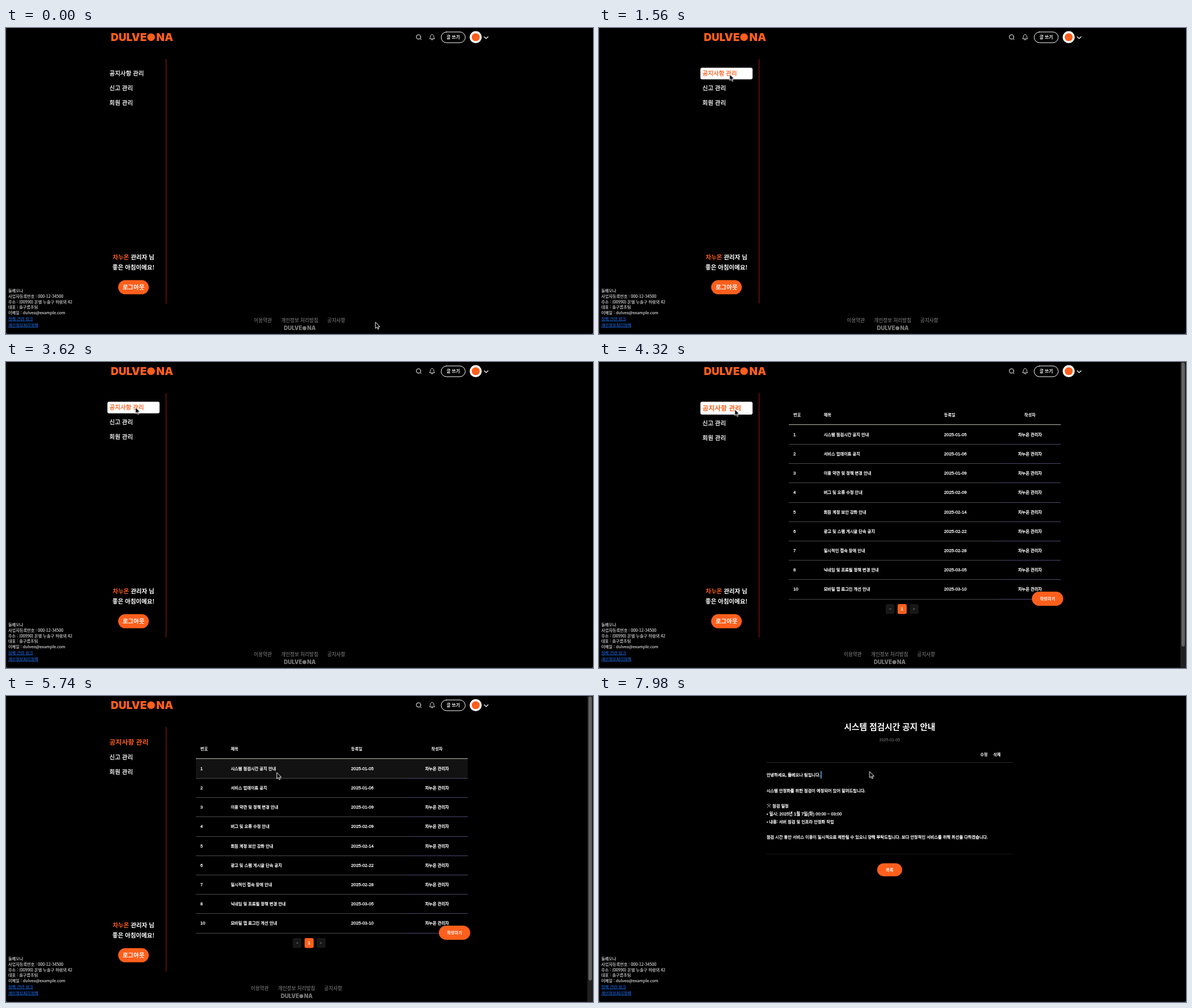
Write an HTML page that moves like this. It is 1036 by 541 pixels and loops after 8 s.

```html
<!DOCTYPE html>
<html lang="ko">
<head>
<meta charset="utf-8">
<title>관리자 공지사항</title>
<style>
  html, body { margin: 0; width: 100%; height: 100%; overflow: hidden; background: #000; }
  svg { display: block; width: 1036px; height: 541px; color: #fff; --brand: #ff5f1c; }
  /* A hairline stroke gives regular glyphs a medium weight. */
  text {
    font-family: "Noto Sans CJK KR", "Noto Sans CJK", "Noto Sans", sans-serif;
    font-size: 7.28px; font-weight: 500; white-space: pre;
    fill: currentColor; stroke: currentColor; stroke-width: .28px;
  }
  .b, .hello text { font-weight: 700; stroke: none; }
  .mid { text-anchor: middle; }
  .menu text, .hello text { font-size: 10.5px; }
  .num { font-family: "Liberation Sans", "Noto Sans CJK KR", sans-serif; font-size: 7.8px; }
  .info text { font-size: 7.2px; font-weight: 400; color: #e6e6e6; stroke-width: .12px; }
  .info .link { color: #1f69e0; text-decoration: underline; }
  .foot text { font-size: 8.6px; font-weight: 400; color: #7c7c7c; stroke-width: .1px; }
  .logo text { font: 900 19px Inter, sans-serif; fill: inherit; stroke: none; }
  .brand { fill: var(--brand); }
  .icon { fill: none; stroke: #fff; stroke-linecap: round; stroke-linejoin: round; }

  .home, .list, .post, .caret, .row1, .row2, .foot { animation: 8s step-end infinite; }
  .home { animation-name: home; }
  .list { animation-name: list; }
  .post { animation-name: post; }
  .caret { animation-name: caret; }
  .row1 { animation-name: row1; }
  .row2 { animation-name: row2; }
  .foot { animation-name: foot; }
  .pick, .pickBox, .other, .memberBox, .member, .cursor { animation: 8s linear infinite; }
  .pick { animation-name: pick; }
  .pickBox { animation-name: pickBox; }
  .other { animation-name: other; }
  .memberBox { animation-name: memberBox; }
  .member { animation-name: member; }
  .cursor { animation-name: cursor; }

  @keyframes home { 0% { opacity: 1 } 88.75%, 100% { opacity: 0 } }
  @keyframes list { 0% { opacity: 0 } 50% { opacity: 1 } 88.75%, 100% { opacity: 0 } }
  @keyframes post { 0% { opacity: 0 } 88.75%, 100% { opacity: 1 } }
  @keyframes caret { 0% { opacity: 0 } 95%, 100% { opacity: 1 } }
  @keyframes foot { 0% { transform: none } 50%, 100% { transform: translateX(-5.5px) } }
  @keyframes row1 { 0% { opacity: 0 } 60.3% { opacity: 1 } 62.4% { opacity: 0 } 69.5%, 100% { opacity: 1 } }
  @keyframes row2 { 0% { opacity: 0 } 62.4% { opacity: 1 } 69.5%, 100% { opacity: 0 } }
  @keyframes pick {
    0%, 15% { color: #fff; font-size: 10.5px; font-weight: 500; stroke-width: .28px; transform: none }
    18% { color: #ff5f1c }
    50% { font-size: 10.5px; font-weight: 500; stroke-width: .28px; transform: none; animation-timing-function: ease }
    56%, 100% { color: #ff5f1c; font-size: 11.9px; font-weight: 700; stroke-width: 0px; transform: translateY(1.6px) }
  }
  @keyframes pickBox {
    0%, 15% { opacity: 0; height: 20.5px }
    18%, 59% { opacity: 1 }
    50% { height: 20.5px; animation-timing-function: ease }
    56%, 100% { height: 23px }
    59% { animation-timing-function: ease-out }
    63.7%, 100% { opacity: 0 }
  }
  @keyframes other {
    0%, 50% { transform: none; animation-timing-function: ease }
    56%, 100% { transform: translateY(2px) }
  }
  @keyframes memberBox { 0%, 8.5% { opacity: 0 } 10.7% { opacity: .9 } 13.75% { opacity: .12 } 15%, 100% { opacity: 0 } }
  @keyframes member { 0%, 8.5% { color: #fff } 10.7% { color: #ff5f1c } 13.75%, 100% { color: #fff } }
  @keyframes cursor {
    0%, 1% { transform: translate(652px, 520px); animation-timing-function: ease-in-out }
    10.3% { transform: translate(236px, 127px) }
    13.75% { transform: translate(241px, 97.5px); animation-timing-function: ease-out }
    17% { transform: translate(231px, 82px) }
    30%, 50% { transform: translate(228.5px, 80px); animation-timing-function: ease-in-out }
    54% { transform: translate(239.5px, 83.5px) }
    57% { transform: translate(244px, 85px); animation-timing-function: ease-in-out }
    63.25%, 67.5% { transform: translate(481.5px, 151.5px); animation-timing-function: ease-in-out }
    73%, 100% { transform: translate(477.5px, 133.5px) }
  }
</style>
</head>
<body>
<svg viewBox="0 0 1036 541">
  <rect width="1036" height="541"/>
  <path d="M.5 0V540.5H1036" fill="none" stroke="#12191e"/>
  <path d="M0 538Q0 541 3 541H0ZM1036 538Q1036 541 1033 541H1036Z" fill="#66747e"/>

  <g class="home">
    <defs>
      <g id="logo" class="logo">
        <text x="-1" y="13.5">DULVE</text>
        <circle cx="70" cy="6.7" r="6.8"/>
        <text x="109" y="13.5" text-anchor="end">NA</text>
      </g>
    </defs>
    <use href="#logo" x="186" y="9.5" class="brand"/>
    <g class="icon">
      <circle cx="728" cy="15.8" r="3.9"/>
      <path d="M731 18.8L732.8 20.6"/>
      <path d="M747.8 18.8C749.4 17.4 748.6 14.8 749.3 13.4C750.4 11 753.6 11 754.7 13.4C755.4 14.8 754.6 17.4 756.2 18.8ZM750.8 20.8H753.2" stroke-width=".9"/>
      <rect x="768" y="7" width="42.5" height="19" rx="9.5"/>
      <path d="M844 15.5L847.4 18.8L850.8 15.5" stroke-width="1.2"/>
    </g>
    <text class="b mid" x="789.3" y="19.3" style="font-size:7.7px">글 쓰기</text>
    <circle cx="829" cy="16.2" r="10.6" fill="#fff"/>
    <circle class="brand" cx="829" cy="16.2" r="7"/>

    <rect x="282" y="55" width="1" height="432" fill="#9c1a0c"/>
    <g class="menu">
      <rect class="pickBox" x="179" y="70.2" width="92" height="20.5" rx="3" fill="#fff"/>
      <rect class="memberBox" x="179" y="122.3" width="92" height="20.3" rx="3" fill="#fff"/>
      <text class="pick" x="182.5" y="84.4">공지사항 관리</text>
      <g class="other">
        <text x="182.5" y="110.3">신고 관리</text>
        <text class="member" x="182.5" y="136.4">회원 관리</text>
      </g>
    </g>
    <g class="hello mid">
      <text x="225" y="409.4"><tspan class="brand">차누온</tspan> 관리자 님</text>
      <text x="225" y="427">좋은 아침이에요!</text>
      <rect class="brand" x="198" y="445.8" width="54" height="25" rx="12.5"/>
      <text x="225" y="462.2">로그아웃</text>
    </g>

    <g class="foot">
      <text x="437.5" y="520.3">이용약관</text>
      <text x="485.5" y="520.3">개인정보 처리방침</text>
      <text x="567" y="520.3">공지사항</text>
      <use href="#logo" transform="translate(491 527.4) scale(.51)" fill="#777"/>
    </g>
  </g>

  <g class="list">
    <rect class="row1" x="335" y="111" width="480" height="34.5" fill="#121212"/>
    <rect class="row2" x="335" y="146" width="480" height="34" fill="#121212"/>
    <text class="b" x="343" y="96.2">번호</text>
    <text class="b" x="396.7" y="96.2">제목</text>
    <text class="b" x="609" y="96.2">등록일</text>
    <text class="b mid" x="760.5" y="96.2">작성자</text>
    <rect x="335" y="110.2" width="480" height="1" fill="#c8c8b8"/>
    <g id="rows"></g>
    <rect class="brand" x="764" y="406" width="55.3" height="25" rx="12.5"/>
    <text class="b mid" x="791.5" y="421.3">작성하기</text>
    <g class="mid">
      <rect x="506" y="428" width="15.5" height="17.5" rx="3" fill="#171717"/>
      <rect class="brand" x="527" y="428" width="16" height="17.5" rx="3"/>
      <rect x="548" y="428" width="16" height="17.5" rx="3" fill="#171717"/>
      <text x="513.8" y="439" style="color:#666;font-size:6px">&lt;</text>
      <text class="num" x="535" y="439.4">1</text>
      <text x="556" y="439" style="color:#666;font-size:6px">&gt;</text>
    </g>
    <rect x="1026" width="10" height="541" fill="#202020"/>
    <rect x="1028" y="1" width="6" height="502" rx="3" fill="#636363"/>
  </g>

  <g class="post">
    <text class="b mid" x="513" y="60.3" style="font-size:14.7px">시스템 점검시간 공지 안내</text>
    <text class="num mid" x="513" y="79.5" style="font-size:7.1px;color:#888;stroke:none">2025-01-05</text>
    <text class="b" x="672.7" y="105.8">수정</text>
    <text class="b" x="695.7" y="105.8">삭제</text>
    <rect x="296" y="117" width="434" height="1" fill="#2a2a2a"/>
    <text x="295.7" y="141.8">안녕하세요, 둘베오나 팀입니다.</text>
    <rect class="caret" x="391" y="132.5" width="2" height="13.5" fill="#4f86b4"/>
    <text x="295.7" y="169.6">시스템 안정화를 위한 점검이 예정되어 있어 알려드립니다.</text>
    <path class="icon" d="M297 197.5L302 192M297.5 191.5L302.5 197M296.8 192.4L299 190.6M301.2 190.8L303 192.6" style="stroke:#aaa"/>
    <text x="306" y="197">점검 일정</text>
    <text class="num" x="295.7" y="211" style="font-size:7.5px">• 일시: 2025년 1월 7일(화) 00:00 ~ 03:00</text>
    <text x="295.7" y="224.7">• 내용: 서버 점검 및 인프라 안정화 작업</text>
    <text x="295.7" y="252.4">점검 시간 동안 서비스 이용이 일시적으로 제한될 수 있으니 양해 부탁드립니다. 보다 안정적인 서비스를 위해 최선을 다하겠습니다.</text>
    <rect x="296" y="279" width="434" height="1" fill="#161616"/>
    <rect class="brand" x="491" y="295.7" width="44" height="23" rx="11.5"/>
    <text class="b mid" x="513" y="309.8">목록</text>
  </g>

  <g class="info">
    <text x="4" y="467.2">둘베오나</text>
    <text x="4" y="476.9">사업자등록번호 : 000-12-34500</text>
    <text x="4" y="486.5">주소 : (00990) 온별 누솔구 하람뫼 42</text>
    <text x="4" y="496">대표 : 솔구름조팀</text>
    <text x="4" y="505.6">이메일 : dulveo@example.com</text>
    <text class="link" x="4" y="516.6">정책 관련 링크</text>
    <text class="link" x="4" y="527.6">개인정보처리정책</text>
  </g>

  <path class="cursor" d="M0 0V11.2L2.6 8.8L4.3 12.7L6.1 11.9L4.5 8.2H8Z" fill="#000" stroke="#fff" stroke-width="1" stroke-linejoin="round"/>
</svg>
<script>
  const notices = [
    [1, "시스템 점검시간 공지 안내", "01-05"],
    [2, "서비스 업데이트 공지", "01-06"],
    [3, "이용 약관 및 정책 변경 안내", "01-09"],
    [4, "버그 및 오류 수정 안내", "02-09"],
    [5, "회원 계정 보안 강화 안내", "02-14"],
    [6, "광고 및 스팸 게시글 단속 공지", "02-22"],
    [7, "일시적인 접속 장애 안내", "02-28"],
    [8, "닉네임 및 프로필 정책 변경 안내", "03-05"],
    [10, "모바일 앱 로그인 개선 안내", "03-10"]
  ];
  const pitch = 34.2;
  document.getElementById("rows").innerHTML = notices.map(([no, title, day], i) => {
    const y = 130.8 + i * pitch;
    const line = Math.round(145 + i * pitch);
    return `<text class="num" x="343" y="${y}">${no}</text>
      <text x="396.7" y="${y}">${title}</text>
      <text class="num" x="609" y="${y}">2025-${day}</text>
      <text class="mid" x="760.7" y="${y}">차누온 관리자</text>
      <rect x="335" y="${line}" width="371" height="1" fill="#4a4a4a"/>
      <rect x="706" y="${line}" width="109" height="1" fill="#4a486e"/>`;
  }).join("");
</script>
</body>
</html>
```
